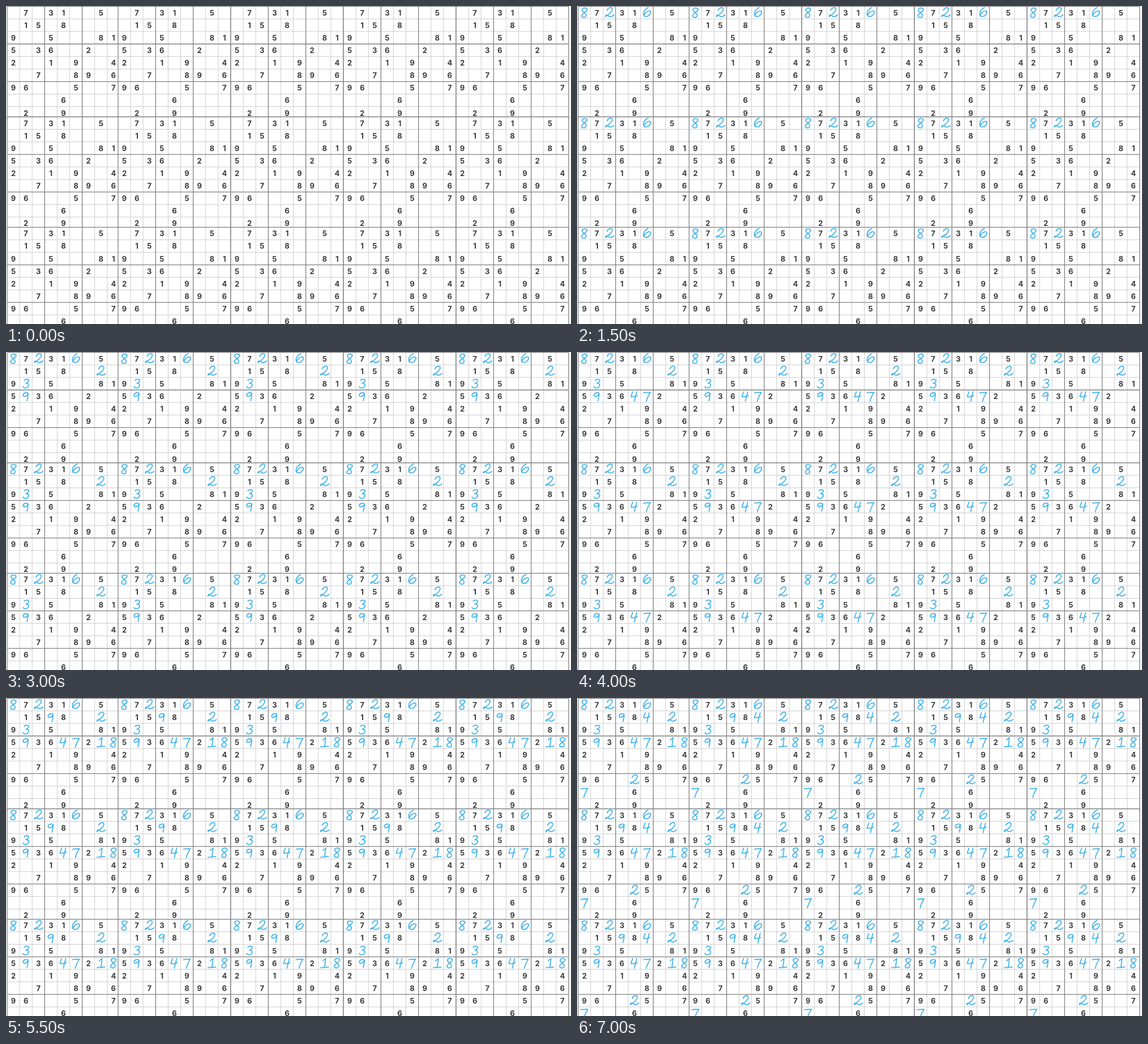
An HTML page for the animation above (7.5 s loop, 998 by 561 pixels).

```html
<!DOCTYPE html>
<html lang="en">
<head>
<meta charset="utf-8">
<title>Sudoku wall</title>
<style>
html, body { margin: 0; width: 100%; height: 100%; overflow: hidden; background: #fff; }
svg { display: block; }
text { font: 700 13px Inter, "Open Sans", sans-serif; fill: #3a3a3a; text-anchor: middle; }
.thin { stroke: #ccc; }
.thick { stroke: #808080; stroke-width: 1.3; }
.ink { fill: none; stroke: #45b4ea; stroke-width: 1.8; stroke-linecap: round; stroke-linejoin: round; }
</style>
</head>
<body>
<svg id="stage" width="998" height="561"></svg>
<script>
const CELL = 22.1, SIZE = CELL * 9, STEP = 500;
const rows = [
  '.7.31..5.', '.15.8....', '9..5...81',
  '5.36..2..', '2..1.9..4', '..7..89.6',
  '96...5..7', '....6....', '.2..9....'
];

// Each move is a digit, its row and its column
const moves = '800 202 605 321 931 217 434 735 137 838 913 415 770 264'.split(' ');

// Handwritten digits, drawn around the centre of a cell
const pen = {
  1: 'M-3-4L2-8L0 8M-7 8L7 7',
  2: 'M-4-4C-3-8 3-11 5-7C6-3-1 3-7 7C-7 3-3 4-1 6C1 8 5 7 8 4',
  3: 'M-3-6C0-9 6-8 5-5C4-2 1-1 0-1C5-1 6 3 4 5C1 9-4 8-5 5',
  4: 'M-3-8C-4-5-6-2-6 1C-3 1 2 1 5-1M4-8C3-3 1 3 0 9',
  6: 'M2-9C-3-7-7-1-6 3C-6 8 1 8 4 4C8 0 7-4 3-3C-1-2-5 2-5 5',
  7: 'M-6-6C-2-7 2-7 6-7C3-2 0 3-1 9',
  8: 'M5-6C2-10-5-8-4-4C-3-1 4 1 3 5C3 10-5 9-5 5C-4 1 4-1 5-6',
  9: 'M4-5C0-8-5-5-5-2C-5 2 2 1 4-5C4-1 3 3 2 8'
};

const mid = i => (+i + .5) * CELL;
const tag = (name, attrs, body = '') => `<${name} ${attrs}>${body}</${name}>`;

function gridLines() {
  const paths = { thin: '', thick: '' };
  for (let i = 0; i < 10; i++) {
    const p = i * CELL;
    paths[i % 3 ? 'thin' : 'thick'] += `M${p} 0V${SIZE}M0 ${p}H${SIZE}`;
  }
  return Object.entries(paths).map(([kind, d]) => tag('path', `class="${kind}" d="${d}"`)).join('');
}

const clues = rows.map((row, r) => [...row].map((n, c) =>
  n === '.' ? '' : tag('text', `x="${mid(c)}" y="${mid(r) + 5}"`, n)).join('')).join('');

const answers = moves.map(([n, r, c]) =>
  tag('path', `class="ink" d="${pen[n]}" transform="translate(${mid(c)} ${mid(r)})"`)).join('');

const board = tag('rect', `width="${SIZE}" height="${SIZE}" fill="#fff"`) + gridLines() + clues + answers;

// Boards overlap slightly, each covering the end of the one before
let tiles = '';
for (let j = 0; j < 3; j++)
  for (let i = 0; i < 5; i++)
    tiles += tag('g', `transform="translate(${Math.max(2, 199 * i - 1)} ${.7 + 194.8 * j})"`, board);

const stage = document.getElementById('stage');
stage.innerHTML = tiles;
const inks = stage.querySelectorAll('.ink');
const start = performance.now();

function draw(now) {
  const shown = Math.floor(Math.max(0, now - start) / STEP) % (moves.length + 1);
  inks.forEach((ink, i) => {
    ink.style.display = i % moves.length < shown ? '' : 'none';
  });
  requestAnimationFrame(draw);
}
draw(start);
</script>
</body>
</html>
```
